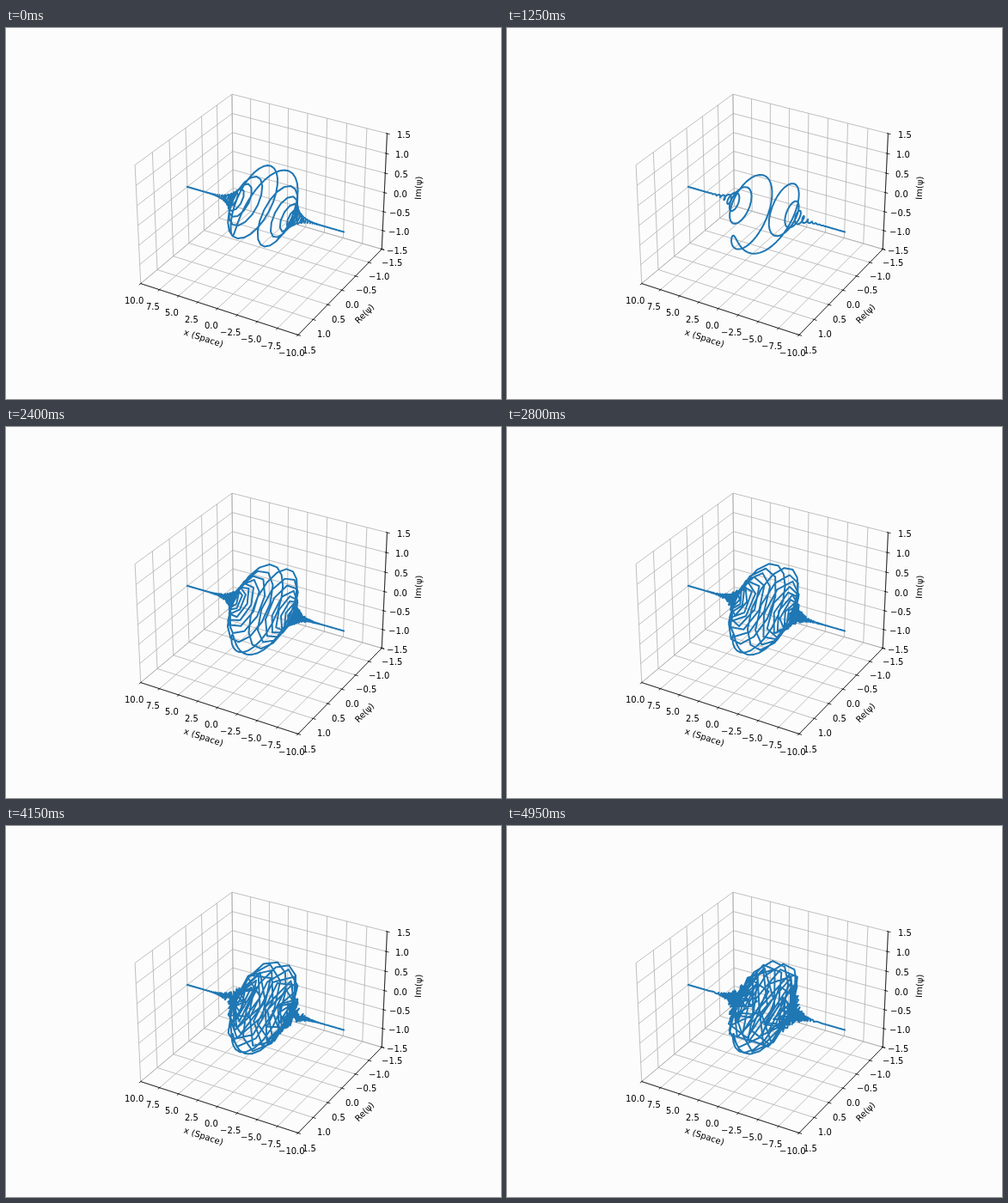
An HTML page with a canvas that plays this animation: 576 px wide and 432 px high, repeating every 5 s.

```html
<!DOCTYPE html>
<html lang="en">
<head>
<meta charset="utf-8">
<title>Chirped wave packet</title>
<style>
  html, body { margin: 0; overflow: hidden; background: #fcfcfc; }
  canvas { display: block; }
</style>
</head>
<body>
<canvas id="stage" width="576" height="432"></canvas>
<script>
const ctx = document.getElementById('stage').getContext('2d');
const FRAME_MS = 50, FRAMES = 100, SAMPLES = 400;
const LABEL_GAP = 0.0677, TITLE_GAP = 0.1472;

// Perspective view of a box whose coordinates run from -0.5 to 0.5.
const ELEV = Math.PI / 6, AZIM = -Math.PI / 3;
const se = Math.sin(ELEV), ce = Math.cos(ELEV), sa = Math.sin(AZIM), ca = Math.cos(AZIM);

function project([a, b, c]) {
  const x = a * 25 / 21, y = b * 25 / 21, z = c * 25 / 28;
  const k = 1763.03 / (10 - (ce * ca * x + ce * sa * y + se * z));
  return [299.61 + k * (ca * y - sa * x),
          210.51 - k * (ce * z - se * ca * x - se * sa * y)];
}

function stroke(points, color, width) {
  ctx.beginPath();
  points.forEach(p => ctx.lineTo(...project(p)));
  ctx.strokeStyle = color;
  ctx.lineWidth = width;
  ctx.stroke();
}

// edge: point on the axis line pushed outward by d; tick: the same along one direction only.
const axes = [
  { title: 'x (Space)', start: 10, step: -2.5, count: 9,
    edge: (p, d) => [p, -.5 - d, -.5 - d],
    tick: (p, d) => [p, -.5 - d, -.5],
    grid: p => [[p, -.5, -.5], [p, .5, -.5], [p, .5, .5]] },
  { title: 'Re(ψ)', start: 1.5, step: -.5, count: 7,
    edge: (p, d) => [.5 + d, p, -.5 - d],
    tick: (p, d) => [.5 + d, p, -.5],
    grid: p => [[.5, p, -.5], [-.5, p, -.5], [-.5, p, .5]] },
  { title: 'Im(ψ)', start: -1.5, step: .5, count: 7,
    edge: (p, d) => [.5 + d, .5 + d, p],
    tick: (p, d) => [.5 + d, .5, p],
    grid: p => [[-.5, -.5, p], [-.5, .5, p], [.5, .5, p]] }
];

function eachTick(axis, draw) {
  for (let i = 0; i < axis.count; i++)
    draw(i / (axis.count - 1) - .5, axis.start + i * axis.step);
}

function drawTickLabel(axis, pos, value) {
  const text = value.toFixed(1).replace('-', '−');
  const [x, y] = project(axis.edge(pos, LABEL_GAP));
  ctx.fillText(text, Math.round(x - ctx.measureText(text).width / 2), Math.round(y + 7.6));
}

function drawTitle(axis) {
  const [x0, y0] = project(axis.edge(-.5, 0));
  const [x1, y1] = project(axis.edge(.5, 0));
  ctx.save();
  ctx.translate(...project(axis.edge(0, TITLE_GAP)));
  ctx.rotate(Math.atan2(y1 - y0, x1 - x0));
  ctx.fillText(axis.title, -ctx.measureText(axis.title).width / 2, 2.6);
  ctx.restore();
}

function drawAxes() {
  ctx.font = '10px "DejaVu Sans", sans-serif';
  ctx.fillStyle = '#000';
  ctx.lineCap = 'butt';
  for (const axis of axes)
    eachTick(axis, pos => stroke(axis.grid(pos), '#b0b0b0', .8));
  for (const axis of axes) {
    stroke([axis.edge(-.5, 0), axis.edge(.5, 0)], '#000', .8);
    drawTitle(axis);
    eachTick(axis, (pos, value) => {
      stroke([axis.tick(pos, -.008), axis.tick(pos, .016)], '#000', .8);
      drawTickLabel(axis, pos, value);
    });
  }
}

// Gaussian envelope with a quadratic phase that changes steadily with time.
function drawWave(step) {
  const chirp = (16 - step) / 9;
  const points = Array.from({ length: SAMPLES }, (_, i) => {
    const x = -10 + 20 * i / (SAMPLES - 1);
    const size = Math.exp(-x * x / 9), phase = chirp * x * x;
    return [-x / 20, -size * Math.cos(phase) / 3, size * Math.sin(phase) / 3];
  });
  ctx.lineCap = 'square';
  ctx.lineJoin = 'round';
  stroke(points, '#1f77b4', 2);
}

function render(now) {
  ctx.fillStyle = '#fcfcfc';
  ctx.fillRect(0, 0, 576, 432);
  drawAxes();
  drawWave(Math.floor(now / FRAME_MS) % FRAMES);
  requestAnimationFrame(render);
}

const begin = performance.now();
render(0);
function loop() {}
</script>
</body>
</html>
```
